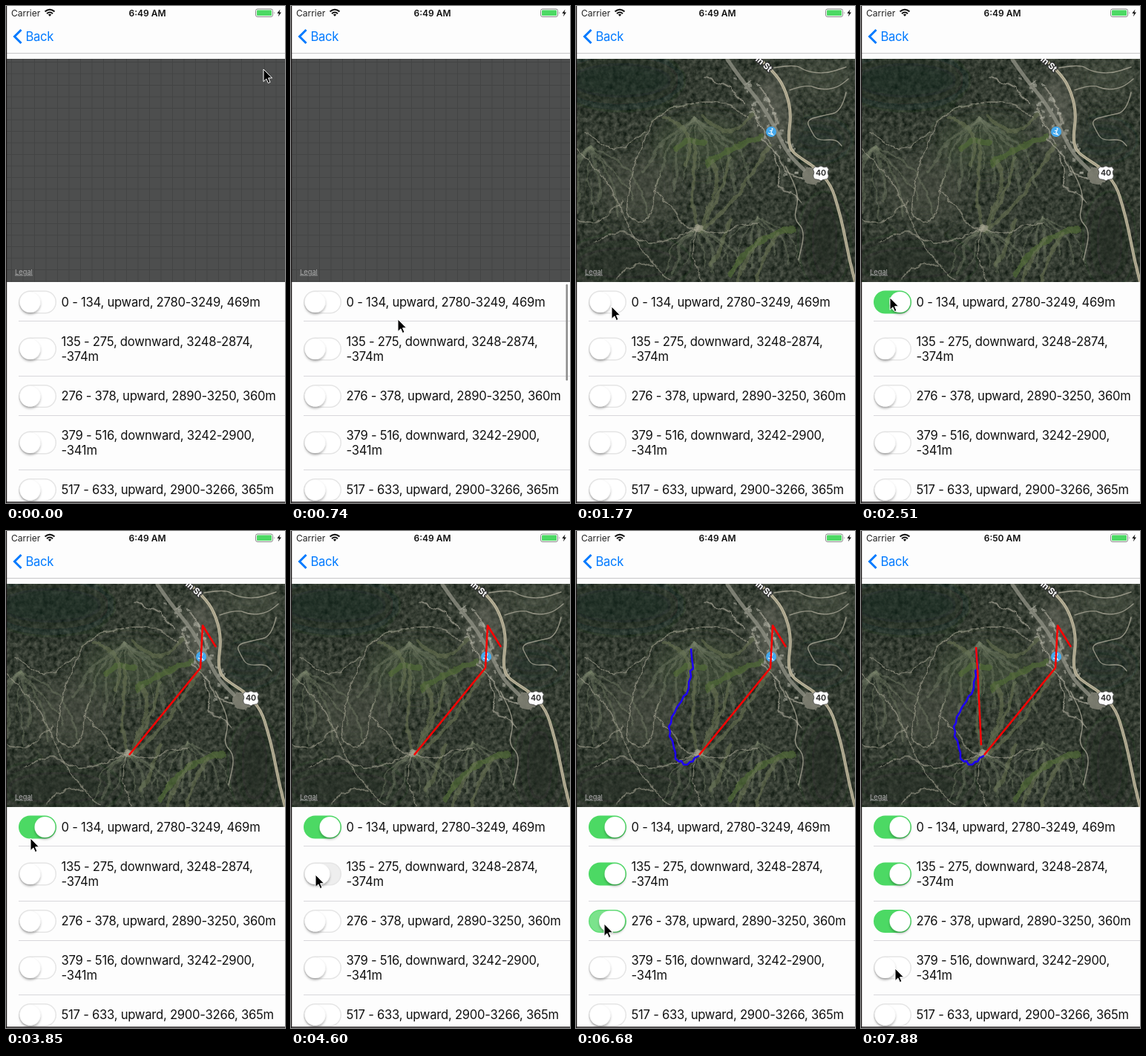
Animation of 376 by 668 pixels, one loop 8 s. Source, as an HTML page:

```html
<!DOCTYPE html>
<html lang="en">
<head>
<meta charset="utf-8">
<title>Ski track segments</title>
<style>
html, body { margin: 0; width: 100%; height: 100%; overflow: hidden; background: #fdfdfd; }
svg { display: block; width: 376px; height: 668px; }
text { font-family: Inter, Roboto, sans-serif; }
.row { font-size: 16.6px; letter-spacing: -0.24px; fill: #111; }
</style>
</head>
<body>
<svg id="stage" viewBox="0 0 376 668" xmlns="http://www.w3.org/2000/svg">
  <defs>
    <clipPath id="mapClip"><rect x="1" y="71" width="375" height="300"/></clipPath>
    <pattern id="grid" x="7" y="75" width="15.5" height="15.5" patternUnits="userSpaceOnUse">
      <path d="M0 .5H15.5M.5 0V15.5" stroke="#434444" fill="none"/>
    </pattern>
    <filter id="rough" x="-5%" y="-5%" width="110%" height="110%">
      <feTurbulence type="fractalNoise" baseFrequency=".07" numOctaves="3" seed="4"/>
      <feDisplacementMap in="SourceGraphic" scale="8" xChannelSelector="R" yChannelSelector="G"/>
    </filter>
    <filter id="forest" x="0" y="0" width="100%" height="100%" color-interpolation-filters="sRGB">
      <feTurbulence type="fractalNoise" baseFrequency=".16" numOctaves="4" seed="9"/>
      <feColorMatrix values=".38 0 0 0 .015  .36 0 0 0 .055  .34 0 0 0 .025  0 0 0 0 1"/>
    </filter>
    <filter id="soft" x="-30%" y="-30%" width="160%" height="160%"><feGaussianBlur stdDeviation="12"/></filter>
    <filter id="drop" x="-30%" y="-30%" width="160%" height="170%">
      <feDropShadow dx="0" dy="2.5" stdDeviation="1.6" flood-opacity=".28"/>
    </filter>
  </defs>

  <rect width="376" height="668" fill="#fdfdfd"/>
  <g id="status">
    <text x="7" y="14" font-size="12" fill="#222">Carrier</text>
    <g fill="none" stroke="#111" stroke-width="2">
      <path d="M52.5 7.6Q59 2 65.5 7.6M55 10.3Q59 6.8 63 10.3"/>
      <path d="M56.8 11.6Q59 10 61.2 11.6L59 14Z" fill="#111" stroke="none"/>
    </g>
    <text id="clock" x="190.5" y="13.6" font-size="12" font-weight="600" text-anchor="middle" fill="#111"></text>
    <rect x="336.5" y="4" width="23" height="10.5" rx="2.5" fill="none" stroke="#888"/>
    <rect x="338" y="5.5" width="20" height="7.5" rx="1" fill="#4cd964"/>
    <path d="M361.5 7.5q1.6 1.7 0 3.5z" fill="#888"/>
    <path d="M369.5 4.5L365.3 10h2.6l-1 4.3L371 8.6h-2.6z" fill="#111"/>
  </g>
  <path d="M20.5 32L11.5 41L20.5 50" fill="none" stroke="#007aff" stroke-width="3"/>
  <text x="26.5" y="47" font-size="16.6" letter-spacing="-.3" fill="#007aff">Back</text>
  <path d="M0 63.5H376" stroke="#c6c6c8"/>

  <g clip-path="url(#mapClip)">
    <rect y="71" width="376" height="300" fill="#4d4e4e"/>
    <rect y="71" width="376" height="300" fill="url(#grid)"/>
    <g id="photo">
      <rect y="71" width="376" height="300" filter="url(#forest)"/>
      <g id="tones" filter="url(#soft)"></g>
      <g id="terrain" filter="url(#rough)" fill="none" stroke-linecap="round" stroke-linejoin="round"></g>
      <g id="roads" fill="none" stroke-linecap="round" stroke-linejoin="round"></g>
    </g>
    <g id="labels">
      <g transform="translate(263 169)">
        <circle r="7" fill="#45a9ed"/>
        <circle cx="1.5" cy="-3.6" r="1.1" fill="#fff"/>
        <path d="M-2 -1.5L1.2 -1.5L-.3 1L2 3.2M-4 1.7L3.5 4.6" stroke="#fff" stroke-width="1.1" fill="none"/>
      </g>
      <path d="M322 216q3.6 2 8 -1q4.4 3 8 1l2.6 3.6q-2.6 4 -.4 8q.4 5.5 -5 5.5q-3 .2 -5.2 1.9q-2.2 -1.7 -5.2 -1.9q-5.4 0 -5 -5.5q2.2 -4 -.4 -8z" fill="#fff" stroke="#444" stroke-width=".8"/>
      <text x="330" y="228.3" font-size="10.5" font-weight="700" text-anchor="middle" fill="#333">40</text>
      <text id="street" transform="translate(260 89) rotate(41)" font-size="11.5" font-weight="700" text-anchor="end" fill="#fff" stroke="#333" stroke-width="2.4" paint-order="stroke">in St</text>
    </g>
    <text x="12" y="360.5" font-size="9.3" fill="#aaa" text-decoration="underline">Legal</text>
    <g id="tracks" fill="none" stroke-width="2.5" stroke-linejoin="round"></g>
  </g>

  <g id="list"></g>
  <rect id="bar" x="370.5" y="374" width="2.5" height="129.5" rx="1.25" fill="#8c8c8c"/>
  <path d="M.5 0V668M0 667H376" stroke="#1b1718" stroke-width="1.4"/>
  <path id="cursor" d="M0 0V16.5L3.9 12.9L6.4 18.6L9 17.4L6.5 11.8H11.6Z" fill="#000" stroke="#fff"/>
</svg>
<script>
const LOOP = 8000;
const $ = id => document.getElementById(id);

function add(parent, tag, attrs, text) {
  const el = document.createElementNS("http://www.w3.org/2000/svg", tag);
  for (const key in attrs) el.setAttribute(key, attrs[key]);
  if (text) el.textContent = text;
  parent.appendChild(el);
  return el;
}

// Curve through the midpoints of a short "x,y x,y" list.
function smooth(list) {
  const p = list.split(" ").map(s => s.split(",").map(Number));
  let d = "M" + p[0];
  for (let i = 1; i < p.length - 1; i++) {
    d += `Q${p[i]} ${(p[i][0] + p[i + 1][0]) / 2},${(p[i][1] + p[i + 1][1]) / 2}`;
  }
  return d + "L" + p[p.length - 1];
}

function strokes(parent, color, width, opacity, lists) {
  for (const list of lists) {
    add(parent, "path", { d: smooth(list), stroke: color, "stroke-width": width, opacity });
  }
}

let seed = 17;
function rand() {
  seed = (seed * 16807) % 2147483647;
  return seed / 2147483647;
}

function drawTerrain() {
  const blob = (cx, cy, rx, ry, fill, opacity) => add($("tones"), "ellipse", { cx, cy, rx, ry, fill, opacity });
  blob(60, 100, 80, 32, "#1b261d", .55);
  blob(335, 315, 26, 60, "#1d2a20", .6);
  blob(70, 345, 80, 30, "#202a21", .5);
  blob(325, 180, 40, 22, "#263128", .5);
  blob(165, 185, 60, 35, "#465239", .55);
  blob(85, 245, 55, 45, "#55584c", .45);
  blob(262, 145, 22, 55, "#77796c", .55);
  blob(330, 95, 45, 25, "#596051", .4);

  const land = $("terrain");
  // Cleared runs fanning out below the ridges
  const fans = [[160, 152, 70, 95, 9], [165, 298, 55, 65, 7], [20, 190, 65, 100, 8], [245, 285, 50, 70, 7]];
  for (const [x, y, w, h, n] of fans) {
    for (let i = 0; i < n; i++) {
      const side = (i / (n - 1) - .5) * 2;
      const ex = x + side * w + rand() * 12, ey = y + h * (.65 + rand() * .4);
      const mx = x + side * w * .75, my = y + h * (.2 + rand() * .2);
      strokes(land, "#788069", 1.5 + rand() * 3, .42, [`${x},${y} ${mx},${my} ${(mx + ex) / 2 + 5},${(my + ey) / 2} ${ex},${ey}`]);
    }
  }
  strokes(land, "#536b38", 8, .7, ["135,193 150,178 172,184", "178,211 205,194 227,184 250,176", "207,360 235,322 265,307 293,299"]);
  strokes(land, "#6d7858", 5, .55, [
    "171,147 190,168 214,169 239,145", "184,210 195,235 178,270 170,298",
    "160,180 161,220 155,260 163,296", "208,205 199,240 187,264 177,285",
    "168,302 190,286 224,246 262,185", "119,148 144,160 155,186 147,214",
    "250,311 231,335 219,369", "273,306 253,332 244,370", "208,288 196,320 182,348"
  ]);
  strokes(land, "#a09f8e", 1.5, .65, [
    "103,155 92,181 81,205 73,240 65,277 84,293 103,280 105,249 114,225",
    "103,155 119,140 149,133 174,128 207,132 231,150",
    "1,192 29,219 50,248 63,280 80,316 108,351", "13,170 40,193 65,190 94,168",
    "1,287 23,294 47,279 62,262", "27,318 48,304 73,303 90,321 121,316 165,298",
    "107,249 133,270 144,298 165,300", "170,301 194,309 220,293 248,292",
    "54,366 75,348 95,343 127,368", "164,299 154,329 169,370"
  ]);
  strokes(land, "#b4b1a2", 2, .6, [
    "173,97 199,104 216,119 227,131", "247,110 265,132 272,158", "251,178 273,199 282,222 304,233",
    "267,200 277,225 269,244 291,249 304,265", "239,139 247,162 263,183"
  ]);

  // Buildings along the valley road
  for (let i = 0; i < 42; i++) {
    const t = rand();
    add(land, "rect", {
      x: 222 + t * 70 + (rand() - .5) * 24, y: 90 + t * 130 + (rand() - .5) * 24,
      width: 2 + rand() * 4, height: 2 + rand() * 3, fill: "#b8b8ac", opacity: .55
    });
  }
  add(land, "ellipse", { cx: 320, cy: 228, rx: 15, ry: 12, fill: "#858578", opacity: .85 });
  add(land, "ellipse", { cx: 165, cy: 299, rx: 6, ry: 4, fill: "#aaa695", opacity: .6 });

  const roads = $("roads");
  strokes(roads, "#aaa898", 1.4, .8, [
    "267,83 295,78 310,88 337,91 364,82", "288,113 311,105 330,113 352,110 367,98",
    "364,116 358,142 334,147 310,153 317,168 325,181 350,179 358,188",
    "282,215 294,237 300,261 293,286 309,302 300,341"
  ]);
  strokes(roads, "#8f9084", 5, .8, ["204,72 222,98 244,124 260,149 272,171 285,198 307,220"]);
  strokes(roads, "#c0b99f", 4, .95, ["247,71 270,91 284,117 290,146 286,175 289,194 305,206 324,218 344,241 353,270 361,302 368,339 377,374"]);
  strokes(roads, "#8b8672", .7, .9, ["247,71 270,91 284,117 290,146 286,175 289,194 305,206 324,218 344,241 353,270 361,302 368,339 377,374"]);
}

const track = (color, points) => add($("tracks"), "polyline", { points, stroke: color });

const BLUE_RUN = "155,158 156,170 158,185 154,188 155,196 152,203 152,211 149,219 145,222 142,229 136,237 133,244 129,250 128,258 125,263 127,270 126,276 130,282 132,292 134,298 134,306 139,310 142,309 145,314 150,314 154,310 157,310 160,305 166,302";

const rows = [
  { y: 398, lines: ["0 - 134, upward, 2780-3249, 469m"], press: 2220, shown: 2660 },
  { y: 461, lines: ["135 - 275, downward, 3248-2874,", "-374m"], press: 4600, shown: 4900 },
  { y: 524.5, lines: ["276 - 378, upward, 2890-3250, 360m"], press: 6540, shown: 6830 },
  { y: 587, lines: ["379 - 516, downward, 3242-2900,", "-341m"] },
  { y: 650.5, lines: ["517 - 633, upward, 2900-3266, 365m"] }
];

function drawRow(row) {
  const list = $("list"), top = row.y - 15.5;
  row.track = add(list, "rect", { x: 17.75, y: top + .75, width: 49.5, height: 29.5, rx: 14.75, "stroke-width": 1.5 });
  row.knob = add(list, "rect", { y: top + 1.5, height: 28, rx: 14, fill: "#fff", stroke: "#000", "stroke-opacity": .06, "stroke-width": .5, filter: "url(#drop)" });
  const first = row.lines.length > 1 ? row.y - 4 : row.y + 5.5;
  row.lines.forEach((line, i) => add(list, "text", { x: 74.5, y: first + i * 20, class: "row" }, line));
}

function setSwitch(row, t) {
  const age = row.press === undefined ? -1 : t - row.press;
  const phase = age < 0 ? 0 : age < 140 ? 1 : age < 290 ? 2 : 3;
  row.knob.setAttribute("x", [18.5, 18.5, 31, 38.5][phase]);
  row.knob.setAttribute("width", [28, 34, 35, 28][phase]);
  row.track.setAttribute("fill", ["#fff", "#eee", "#7be38c", "#4cd964"][phase]);
  row.track.setAttribute("stroke", ["#e5e5e5", "#e5e5e5", "#62de77", "#4cd964"][phase]);
}

// [time, x, y]: the pointer is sampled and holds between samples.
const pointer = [
  [0, 347, 85], [150, 340, 102], [300, 309, 165], [440, 249, 272], [590, 183, 376], [740, 144, 421],
  [880, 119, 437], [1030, 104, 440], [1180, 92, 438], [1330, 80, 432], [1480, 68, 424], [1620, 57, 413],
  [1770, 48, 404], [1920, 39, 392], [3850, 33, 413], [4000, 31, 442], [4150, 33, 462],
  [5500, 34, 464], [5640, 34, 479], [5790, 35, 501], [5940, 37, 519], [6090, 38, 528],
  [7280, 38, 533], [7430, 40, 548], [7580, 42, 566], [7730, 45, 581], [7880, 46, 588]
];

function step(list, t) {
  let found = list[0];
  for (const item of list) if (item[0] <= t) found = item;
  return found;
}

const fade = (id, list, t) => $(id).setAttribute("opacity", step(list, t)[1]);

drawTerrain();
rows.forEach(drawRow);
for (const y of [423.5, 497.5, 550.5, 623.5]) add($("list"), "path", { d: `M17 ${y}H376`, stroke: "#d8d7db" });
rows[0].run = track("#f00", "283,156 265,127 262,184 166,301");
rows[1].run = track("#1d00f5", BLUE_RUN);
rows[2].run = track("#f00", "155,156 157,185 162,288");

function draw(t) {
  const [, x, y] = step(pointer, t);
  $("cursor").setAttribute("transform", `translate(${x} ${y})`);
  fade("photo", [[0, 0], [880, .9], [1030, 1]], t);
  fade("labels", [[0, 0], [880, .35], [1030, .8], [1180, 1]], t);
  fade("street", [[0, 0], [1030, .8], [1180, 1]], t);
  fade("bar", [[0, 0], [440, 1], [1330, .5], [1480, 0]], t);
  $("clock").textContent = t < 6980 ? "6:49 AM" : "6:50 AM";
  for (const row of rows) {
    setSwitch(row, t);
    if (row.run) row.run.setAttribute("visibility", t < row.shown ? "hidden" : "visible");
  }
}

function tick() {
  draw(performance.now() % LOOP);
  requestAnimationFrame(tick);
}
tick();
</script>
</body>
</html>
```
